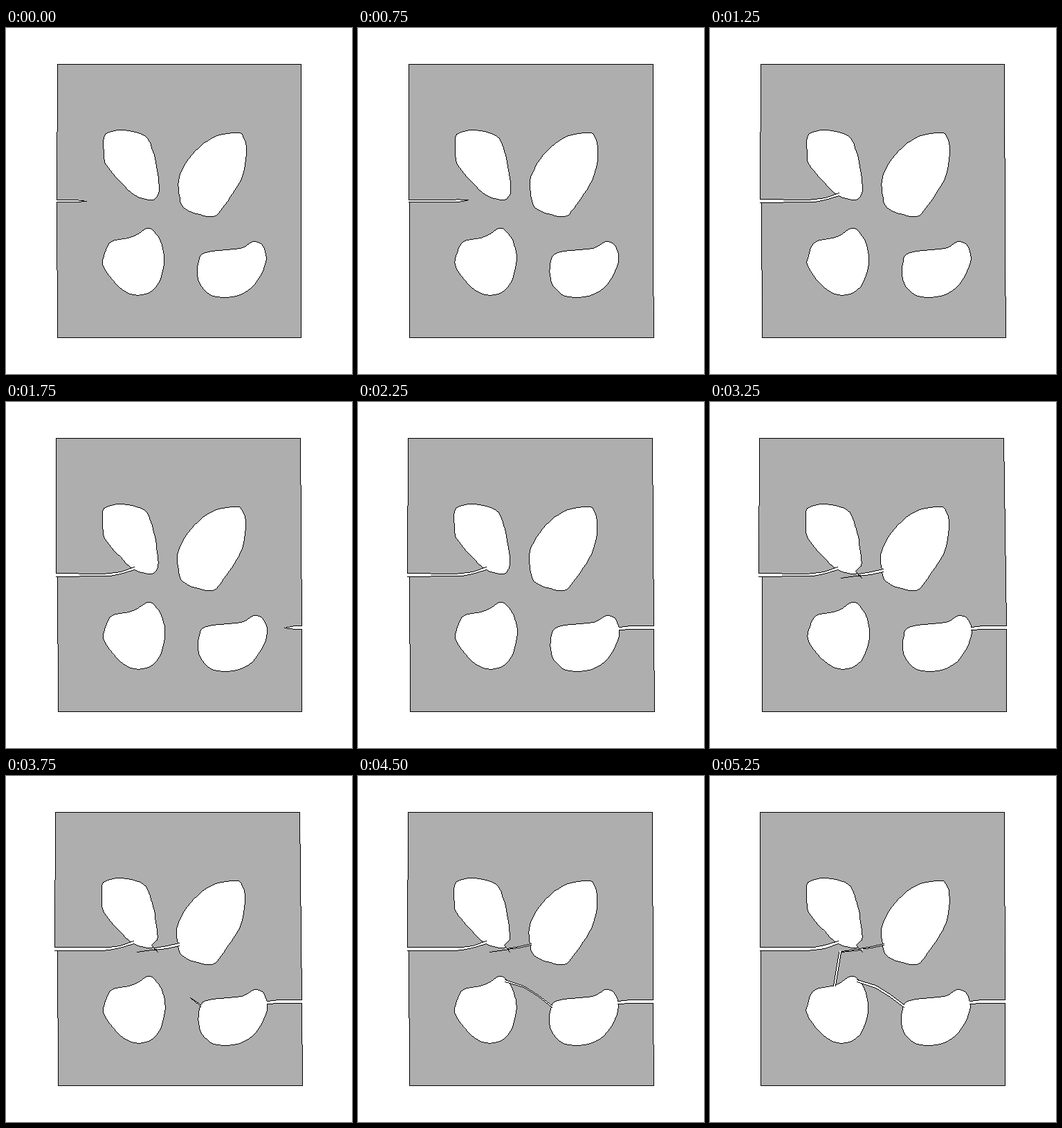
An HTML page with a canvas for the animation above (5500 ms loop, 500 px wide and 500 px high).

```html
<!DOCTYPE html>
<html lang="en">
<head>
<meta charset="utf-8">
<title>Crack growth between holes</title>
<style>
  html, body { margin: 0; width: 100%; height: 100%; overflow: hidden; background: #fff; }
  canvas { display: block; width: 500px; height: 500px; }
</style>
</head>
<body>
<canvas id="stage" width="500" height="500"></canvas>
<script>
const ctx = document.getElementById('stage').getContext('2d');
const LOOP = 5500, STEP = 250, TAPER = 15, GRAY = '#aeaeae';

// Corners of the plate and the edges of both crack mouths
const PLATE = [[74, 52], [426, 52], [425.5, 323], [425.5, 328],
  [426, 447], [74, 447], [73.4, 252], [73.4, 247]];

// Key points of the hole outlines
const HOLES = [
  [[141, 158], [149, 150], [171, 147], [201, 156], [212, 178], [218, 205], [221, 232],
    [217, 244], [206, 248], [184, 240], [162, 219], [144, 197], [141, 182]],
  [[332, 151], [342, 156], [347, 176], [342, 211], [327, 239], [309, 264], [299, 272],
    [275, 268], [256, 259], [250, 242], [250, 214], [268, 183], [298, 158]],
  [[203, 289], [214, 294], [225, 313], [228, 340], [216, 374], [190, 386], [163, 374],
    [141, 346], [141, 328], [152, 308], [182, 301]],
  [[357, 308], [371, 315], [375, 338], [359, 370], [332, 387], [299, 387], [279, 368],
    [277, 340], [288, 324], [338, 318]]
];

// Cracks: centre line, growth time, half gap when starting and at the end of the loop
const CRACKS = [
  { from: 0, to: 1250, notch: 43, gap: [1.9, 2.6], open: true,
    path: [[73.4, 249.5], [140, 249.5], [152, 249], [167, 246.5], [187, 240]] },
  { from: 1250, to: 2250, gap: [2.4, 2.4], open: true,
    path: [[425.5, 325.5], [392, 325.5], [375, 327]] },
  { from: 2500, to: 3000, gap: [2.6, 0.5], open: true,
    path: [[252, 243], [234, 247], [217, 249.5]] },
  { from: 3000, to: 3250, gap: [-2.5, 1.5],
    path: [[220, 250], [192, 253.5]] },
  { from: 3500, to: 4500, gap: [1, 2], open: true,
    path: [[280, 332], [260, 317], [239, 304], [212, 295.5]] },
  { from: 4500, to: 5250, gap: [1.5, 1.5], upright: true, open: true,
    path: [[180, 303], [189, 254]] }
];

// Broken ligament below the first hole
const SPUR = [[220, 237], [213, 244], [216, 248], [221, 254]];

const lerp = (a, b, k) => a + (b - a) * k;
const clamp = k => Math.min(1, Math.max(0, k));
const dist = (a, b) => Math.hypot(b[0] - a[0], b[1] - a[1]);

// The halves beside a slanted seam slide apart, then partly return
function warp([x, y], t) {
  const slide = Math.min(t / 1000, 3, 3 - (t - 3750) / 1250);
  const back = 1.3 * clamp((t - 3250) / 1250);
  const k = (x - 73) / 354, above = y < lerp(250, 320, k);
  return [x + (above ? slide * lerp(-1, -0.6, k) : slide * lerp(0.4, 0.8, k) - back), y];
}

// Closed Catmull-Rom curve
function smooth(pts) {
  const n = pts.length;
  return pts.flatMap((b, i) => {
    const a = pts[(i + n - 1) % n], c = pts[(i + 1) % n], d = pts[(i + 2) % n];
    return [0, 0.2, 0.4, 0.6, 0.8].map(k => [0, 1].map(j => b[j] + 0.5 * k * (c[j] - a[j] +
      k * (2 * a[j] - 5 * b[j] + 4 * c[j] - d[j] + k * (3 * (b[j] - c[j]) + d[j] - a[j])))));
  });
}

function fill(pts, color) {
  ctx.fillStyle = color;
  ctx.beginPath();
  pts.forEach(([x, y]) => ctx.lineTo(x + 0.5, y + 0.5));
  ctx.fill();
}

// Crisp one-pixel line without antialiasing
function stroke(pts, closed) {
  ctx.fillStyle = '#000';
  const p = pts.map(([x, y]) => [Math.round(x), Math.round(y)]);
  if (closed) p.push(p[0]);
  for (let i = 1; i < p.length; i++) {
    const [x0, y0] = p[i - 1], [x1, y1] = p[i];
    const n = Math.max(Math.abs(x1 - x0), Math.abs(y1 - y0), 1);
    for (let k = 0; k <= n; k++) {
      ctx.fillRect(Math.round(lerp(x0, x1, k / n)), Math.round(lerp(y0, y1, k / n)), 1, 1);
    }
  }
}

function shape(pts, color) {
  fill(pts, color);
  stroke(pts, true);
}

// First part of a path, as [x, y, distance along it]
function cut(path, len) {
  const out = [[...path[0], 0]];
  let s = 0;
  for (let i = 1; i < path.length && s < len; i++) {
    const a = path[i - 1], b = path[i], d = dist(a, b), k = Math.min(1, (len - s) / d);
    s += d * k;
    out.push([lerp(a[0], b[0], k), lerp(a[1], b[1], k), s]);
  }
  return out;
}

// Point a little beyond a, seen from b
function beyond(a, b) {
  const d = dist(a, b) || 1;
  return [a[0] + (a[0] - b[0]) / d * 2, a[1] + (a[1] - b[1]) / d * 2];
}

function drawCrack({ from, to, notch = 0, gap, path, open, upright }, t) {
  if (t <= from && !notch) return;
  const route = path.map(p => warp(p, t));
  const total = cut(route, Infinity).pop()[2];
  const grown = clamp((t - from) / (to - from)), done = grown === 1;
  const len = lerp(notch, total, grown);
  let line = cut(route, len);
  if (!done && len > TAPER) {
    const neck = cut(route, len - TAPER).pop();
    line = [...line.filter(p => p[2] < neck[2]), neck, ...line.filter(p => p[2] > neck[2])];
  }
  const half = Math.max(0, lerp(gap[0], gap[1], (t - from) / (LOOP - from)));
  const side = sign => line.map(([x, y, s]) => {
    const w = sign * half * (done ? lerp(1, 0.75, s / total) : clamp((len - s) / TAPER));
    return upright ? [x + w, y] : [x, y + w];
  });
  const a = side(-1), b = side(1), n = a.length - 1;
  const body = [beyond(a[0], a[1]), ...a];
  if (done && open) body.push(beyond(a[n], a[n - 1]), beyond(b[n], b[n - 1]));
  body.push(...b.slice().reverse(), beyond(b[0], b[1]));
  if (half) fill(body, '#fff');
  stroke(a);
  stroke(b);
}

function draw(t) {
  const move = pts => pts.map(p => warp(p, t));
  ctx.fillStyle = '#fff';
  ctx.fillRect(0, 0, 500, 500);
  shape(move(PLATE), GRAY);
  HOLES.forEach(pts => shape(smooth(move(pts)), '#fff'));
  const spur = t >= 3000 ? move(SPUR) : [];
  if (spur.length) fill([...spur.slice(0, 3), [221, 246], [221, 238]], GRAY);
  CRACKS.forEach(c => drawCrack(c, t));
  stroke(spur);
}

let last = -1;
function tick() {
  const t = Math.floor(performance.now() % LOOP / STEP) * STEP;
  if (t !== last) draw(last = t);
  requestAnimationFrame(tick);
}
tick();
</script>
</body>
</html>
```
